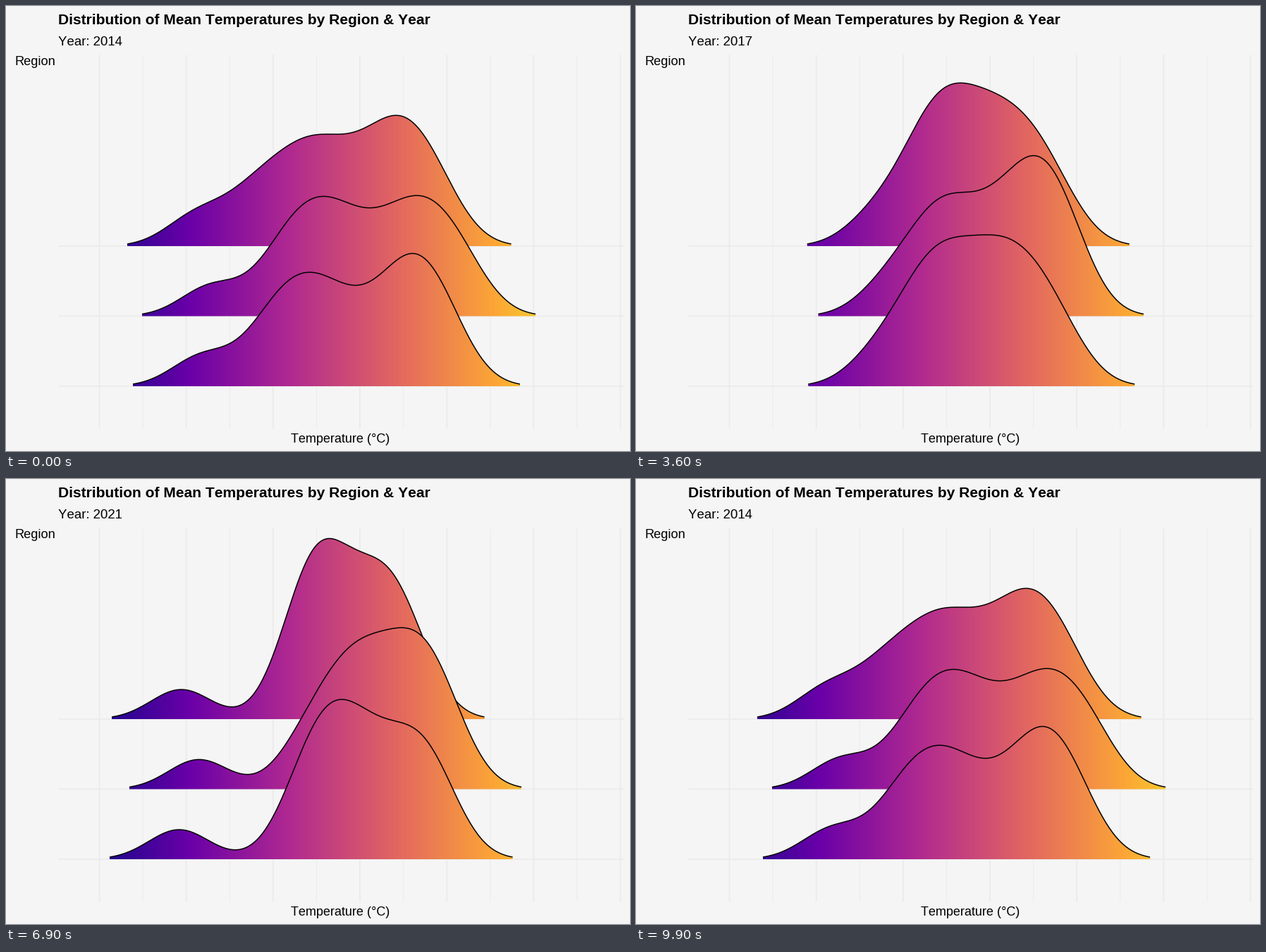
A matplotlib script for the animation above (10000 ms loop, 885x632 px).

```python
import numpy as np
import matplotlib.pyplot as plt
from matplotlib.animation import FuncAnimation
from matplotlib.colors import LinearSegmentedColormap
from matplotlib.path import Path

W, H, DPI = 885, 632, 96
PX = 72 / DPI  # points per pixel
FRAMES, INTERVAL, STEPS = 100, 100, 5
STARTS = (6, 16, 26, 36, 46, 55, 65, 75, 85, 95)  # first frame of each transition
FIRST_YEAR = 2014
BASES = np.array([340.5, 440, 539.5])

# Each ridge is a kernel density of twelve sorted monthly means (in pixels).
BANDWIDTH, KERNEL_HEIGHT, CUT = 43, 42, 3
KEY_RANKS = (0, 1, 3, 5, 7, 9, 11)
SAMPLES = 240

plt.rcParams["font.family"] = "Liberation Sans"
plt.rcParams["text.kerning_factor"] = 12  # no pair kerning

months = {}


def year_from(year, *rows):
    """Three regions, each given by its months at the key ranks."""
    months[year] = np.array([np.interp(range(12), KEY_RANKS, r) for r in rows])


def year_between(year, coldest, warmest, weight=0.5):
    """Mix the neighbouring years and stretch the mix over a new span."""
    mix = lerp(months[year - 1], months[year + 1], weight)
    months[year] = np.interp(mix, (mix.min(), mix.max()), (coldest, warmest))


def lerp(a, b, t):
    return a + (b - a) * t


def density(x, centres):
    z = (x[:, None] - centres) / BANDWIDTH
    return KERNEL_HEIGHT * np.exp(-z * z / 2).sum(axis=1)


def ridge(centres, base):
    """Outline between the points where the tails fall below the cut."""
    x = np.arange(0, W, 0.5)
    inside = x[density(x, centres) > CUT]
    x = np.linspace(inside[0], inside[-1], SAMPLES)
    return np.column_stack([x, base - density(x, centres)])


year_from(2014, (270, 342, 414, 460, 530, 566, 613),
          (291, 384, 436, 480, 553, 596, 648),
          (278, 367, 420, 468, 550, 584, 624))
year_from(2016, (415, 430, 470, 518, 560, 600, 641),
          (458, 478, 538, 576, 606, 647, 700),
          (432, 449, 508, 552, 588, 624, 668))
year_from(2017, (341, 399, 424, 463, 505, 546, 598),
          (356, 409, 436, 505, 553, 582, 612),
          (343, 396, 420, 470, 515, 551, 606))
year_from(2019, (338, 468, 490, 530, 573, 598, 618),
          (372, 522, 545, 570, 600, 640, 678),
          (339, 502, 520, 548, 577, 603, 628))
year_from(2021, (248, 418, 437, 453, 510, 545, 570),
          (273, 422, 482, 510, 561, 593, 624),
          (245, 420, 452, 484, 528, 585, 610))
year_from(2023, (293, 322, 377, 525, 560, 592, 640),
          (344, 375, 434, 583, 616, 642, 702),
          (320, 345, 392, 538, 572, 600, 662))
year_between(2015, 248, 667)
year_between(2018, 342, 614, weight=0.25)
year_between(2020, 296, 648)
year_between(2022, 268, 672)

shapes = {year: np.array([ridge(c, b) for c, b in zip(rows, BASES)])
          for year, rows in months.items()}

fig = plt.figure(figsize=(W / DPI, H / DPI), dpi=DPI, facecolor="#f5f5f5")
ax = fig.add_axes([0, 0, 1, 1])


def grid_line(xs, ys, width):
    ax.plot(xs, ys, color="#ebebeb", lw=width * PX, zorder=0,
            solid_capstyle="butt", snap=False)


for i in range(13):
    x = 132 + i * 61.58
    grid_line([x, x], [69, 600], 0.9 if i % 2 else 1.8)
for y in BASES:
    grid_line([74, 875.5], [y, y], 1.8)


def label(x, y, text, size, **kw):
    return ax.text(x, y, text, fontsize=size, color="black", va="baseline", **kw)


label(73, 25.5, "Distribution of Mean Temperatures by Region & Year", 15.75,
      weight="bold")
subtitle = label(73.5, 55, "", 14)
label(11.5, 83.5, "Region", 13.7)
label(474, 619.5, "Temperature (°C)", 13.5, ha="center")

plasma = LinearSegmentedColormap.from_list(
    "plasma6", ["#0d0887", "#6a00a8", "#b12a90", "#e16462", "#fca636", "#f0f921"],
    N=1024)
fills, lines = [], []
for i, base in enumerate(BASES):
    fills.append(ax.imshow(np.arange(W)[None, :], cmap=plasma, vmin=115, vmax=838,
                           extent=(-0.5, W - 0.5, base + 2, 0), aspect="auto",
                           interpolation="nearest", zorder=2 * i + 2))
    lines += ax.plot([], [], color="black", lw=1.5 * PX, zorder=2 * i + 3,
                     solid_capstyle="butt", solid_joinstyle="round")

ax.set_xlim(-0.5, W - 0.5)
ax.set_ylim(H - 0.5, -0.5)
ax.axis("off")


def state(n):
    """Year left, year entered and progress between them."""
    k = sum(n >= s for s in STARTS) - 1
    if k < 0:
        return FIRST_YEAR, FIRST_YEAR, 1
    t = min((n - STARTS[k] + 1) / STEPS, 1)
    return FIRST_YEAR + k, FIRST_YEAR + (k + 1) % len(STARTS), t


def draw(n):
    old, new, t = state(n)
    curves = lerp(shapes[old], shapes[new], t)
    for curve, base, fill, line in zip(curves, BASES, fills, lines):
        x0, x1 = curve[0, 0], curve[-1, 0]
        area = np.vstack([curve, [(x1, base), (x0, base)]])
        fill.set_clip_path(Path(area), transform=ax.transData)
        line.set_data(curve[:, 0], curve[:, 1])
    subtitle.set_text(f"Year: {new if t > 0.5 else old}")
    return [*fills, *lines, subtitle]


anim = FuncAnimation(fig, draw, frames=FRAMES, interval=INTERVAL, repeat=True,
                     repeat_delay=0, blit=False)
plt.show()
```
